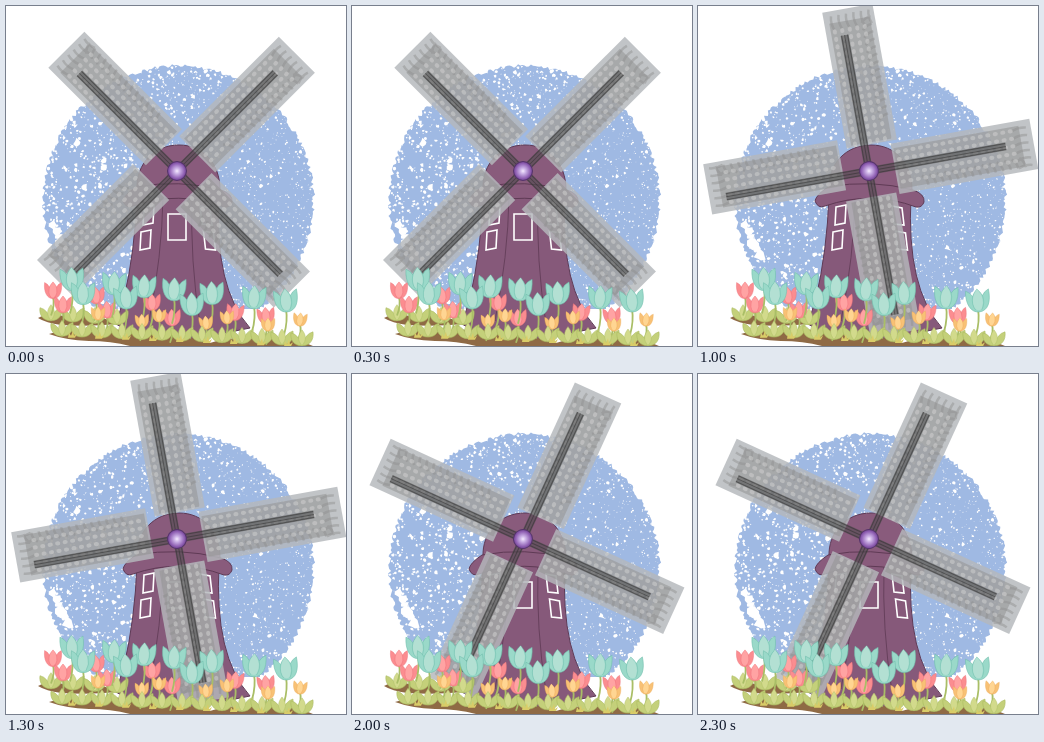
Recreate the animation shown at these times as an HTML page with a canvas. Size 340 by 340 pixels, loop 2.5 s.

```html
<!DOCTYPE html>
<html lang="en">
<head>
<meta charset="utf-8">
<title>Windmill</title>
<style>
html, body { margin: 0; width: 100%; height: 100%; overflow: hidden; background: #fff; }
canvas { display: block; }
</style>
</head>
<body>
<canvas id="stage" width="340" height="340"></canvas>
<script>
const SIZE = 340, HUB = [171, 165], LOOP = 2500, HOLD = 500;
const START = -45, TURN = 17.4;            // degrees, degrees per step
const TEAL = ['#9ad9c9', '#b3e0d3', '#72bfae'];
const PINK = ['#fb8d90', '#ffa3a3', '#ec737c'];
const GOLD = ['#f8c175', '#ffd592', '#e9a95a'];
const stage = document.getElementById('stage').getContext('2d');

let seed = 11;
const rnd = () => (seed = (seed * 16807) % 2147483647) / 2147483647;
const range = (a, b) => a + (b - a) * rnd();

function layer(draw) {
  const canvas = document.createElement('canvas');
  canvas.width = canvas.height = SIZE;
  draw(canvas.getContext('2d'));
  return canvas;
}

function shape(c, d, fill, line, width = 1) {
  const path = new Path2D(d);
  if (fill) { c.fillStyle = fill; c.fill(path); }
  if (line) { c.strokeStyle = line; c.lineWidth = width; c.stroke(path); }
}

// Irregular closed outline around a point.
function blob(c, x, y, r, points = 7, rough = .4) {
  c.beginPath();
  for (let i = 0; i < points; i++) {
    const a = i * Math.PI * 2 / points, k = r * range(1 - rough, 1 + rough);
    c.lineTo(x + k * Math.cos(a), y + k * Math.sin(a));
  }
  c.fill();
}

function sky(c) {
  const [x, y, radius] = [172.5, 195, 135];
  c.fillStyle = '#9fb9e3';
  blob(c, x, y, radius, 400, .014);
  c.clearRect(0, 303, SIZE, 37);
  c.fillStyle = '#fff';
  const scatter = (count, size) => {
    for (let i = 0; i < count; i++) {
      const a = range(0, Math.PI * 2), r = radius * rnd() ** .42;
      const left = 1 - .25 * Math.cos(a);
      blob(c, x + r * Math.cos(a), y + r * Math.sin(a), size() * left);
    }
  };
  scatter(2100, () => .4 + 1.1 * rnd() ** 2);
  scatter(45, () => range(1.5, 3));
  for (let i = 0; i < 6; i++) blob(c, 47 + i * 3, 219 + i * 6, range(3, 6), 9);
}

function tower(c) {
  const edge = '#5f3a55', wall = '#86597a';
  shape(c, 'M131 190 Q129 245 118 292 L110 318 L146 339 H160 L244 322 Q208 282 213 190Z', wall, edge);
  shape(c, 'M157 191 Q156 250 143 315 M186 191 Q184 255 194 318', null, edge, .8);
  let panes = 'M162 208h18v26h-18z';
  for (let row = 0; row < 2; row++) {
    const y = 200 + 25 * row;
    panes += `M${138 - 3 * row} ${y + 1}l10 -2l-1 18l-10 2z M${194 + 3.5 * row} ${y}l10 2l2 17l-10 -1z`;
  }
  shape(c, panes, null, '#fff', 1.6);
  shape(c, 'M131 183 C130 158 148 139 173 139 C197 139 214 157 214 184Z', '#895b7c', edge);
  shape(c, 'M130 181 Q173 173 215 184 Q227 188 226 196 Q224 202 218 201 Q173 184 127 200' +
    'Q120 203 117 195 Q118 189 130 181Z', '#895b7c', edge);
}

function tulip(c, x, y, s, [main, light, dark]) {
  c.save();
  c.translate(x, y);
  shape(c, `M0 ${s * 8} Q2 ${s * 20} -2 ${s * 34}`, null, '#a9be66', 1.8);
  c.scale(s, s);
  c.rotate((x % 5 - 2) * .05);
  shape(c, 'M-11.5 -11 Q-7 -9 -5 -5 Q-3 -9 0 -12 Q3 -9 5 -5 Q7 -9 11.5 -11 C13 2 9 11 0 11 C-8 11 -13 2 -11.5 -11Z', main, dark, .6);
  shape(c, 'M0 -12 Q8 -2 3 8 Q-1 11 -4 7 Q-8 -2 0 -12Z', light);
  shape(c, 'M-5 -5 Q-7 4 -3 9 M5 -5 Q7 3 3 9', null, dark, .5);
  c.restore();
}

function leaves(c, x, y) {
  c.save();
  c.translate(x, y);
  shape(c, 'M0 8 C-9 8 -12 1 -11 -5 Q-3 -3 0 8 Q3 -4 11 -6 C12 2 8 8 0 8Z', '#c4d07a', '#a9bb60', .6);
  shape(c, 'M0 8 C-5 2 -4 -3 0 -8 C4 -3 5 2 0 8Z', '#d2da8c', '#b0c068', .5);
  c.restore();
}

function garden(c) {
  // The front row stands lower; both rows sink slowly to the right.
  const plant = (colors, size, [base, slope, drop], back, front) => {
    for (const x of back) tulip(c, x, base + slope * x, size, colors);
    for (const x of front) tulip(c, x, base + slope * x + drop, size, colors);
  };
  shape(c, 'M32 312 Q42 306 58 310 Q92 307 112 318 Q82 321 55 319 Q40 317 32 312Z' +
    'M43 328 Q60 322 85 326 Q130 319 181 332 Q206 333 206 340 H124 Q105 335 83 335 Q59 334 43 328Z' +
    'M204 337 Q225 330 252 333 Q290 331 307 340 H204Z', '#8f6a45');
  for (let x = 45; x < 112; x += 22) leaves(c, x, 304 + .06 * x);
  plant(PINK, .73, [279, .12, 13], [47, 90, 146, 229, 260], [57, 101, 166]);
  plant(TEAL, 1, [267, .1, 13], [66, 108, 138, 168, 206, 248, 280], [77, 120, 186]);
  plant(GOLD, .58, [305, .03, 6], [92, 153, 221, 294], [136, 200, 262]);
  for (let x = 56; x < 300; x += 20) leaves(c, x, 320 + .04 * x);
  for (let x = 66; x < 300; x += 27) {
    shape(c, `M${x - 4} ${329 + .04 * x}l1 -5 2 3 2 -5 1 5 3 -2 -2 4Z`, '#d9cc68');
  }
}

// Sail in local axes: hub at 0,0 and the tip pointing up.
function sail(c, left, tip, spar) {
  const w = 51, h = tip - 26, gap = 7.6;
  c.save();
  c.translate(left, -tip);
  c.filter = 'blur(.7px)';
  c.fillStyle = 'rgba(181,185,188,.83)';
  c.fillRect(0, 0, w, h);
  c.fillStyle = 'rgba(148,148,148,.55)';
  c.fillRect(5, 12, w - 10, h - 14);
  c.strokeStyle = 'rgba(143,143,143,.45)';
  c.lineWidth = 2.5;
  c.beginPath();
  for (let x = 8; x < w - 4; x += gap) { c.moveTo(x, 5); c.quadraticCurveTo(x - 2, 12, x + 1, 19); }
  for (let y = 12; y < h - 25; y += gap) { c.moveTo(w - 4, y); c.quadraticCurveTo(w - 10, y, w - 14, y + 5); }
  c.stroke();
  c.fillStyle = 'rgba(205,205,205,.55)';
  for (let y = 21; y < h - 3; y += gap) {
    for (let x = 9; x < w - 4; x += gap) {
      c.beginPath();
      c.ellipse(x, y, 2.1, 2.6, 0, 0, 7);
      c.fill();
    }
  }
  c.restore();
  c.fillStyle = 'rgba(75,75,75,.55)';
  c.fillRect(-4, -spar, 8, spar);
  c.fillStyle = 'rgba(45,45,45,.5)';
  for (let x = -3.5; x < 3; x += 3) c.fillRect(x, -spar, 1, spar);
}

function hub(c) {
  const glow = c.createRadialGradient(0, 0, 0, 0, 0, 10);
  glow.addColorStop(0, '#f5eaff');
  glow.addColorStop(.3, '#c9aee4');
  glow.addColorStop(.75, '#8e5eb2');
  glow.addColorStop(1, '#673d87');
  c.beginPath();
  c.arc(0, 0, 9.5, 0, 7);
  c.fillStyle = glow;
  c.fill();
  c.strokeStyle = '#55336a';
  c.lineWidth = 1;
  c.stroke();
}

const back = layer(c => { sky(c); tower(c); });
const front = layer(garden);
const arms = [[-18, 164, 138], [-23, 167, 139], [-23, 165, 146], [-15, 162, 145]];  // left, tip, spar

function draw(step) {
  stage.clearRect(0, 0, SIZE, SIZE);
  stage.drawImage(back, 0, 0);
  stage.save();
  stage.translate(...HUB);
  stage.rotate((START + TURN * step) * Math.PI / 180);
  for (const arm of arms) { sail(stage, ...arm); stage.rotate(Math.PI / 2); }
  hub(stage);
  stage.restore();
  stage.drawImage(front, 0, 0);
}

let shown = -1;
function tick() {
  const step = Math.floor(performance.now() % LOOP / HOLD);
  if (step !== shown) draw(shown = step);
  requestAnimationFrame(tick);
}
tick();
</script>
</body>
</html>
```
